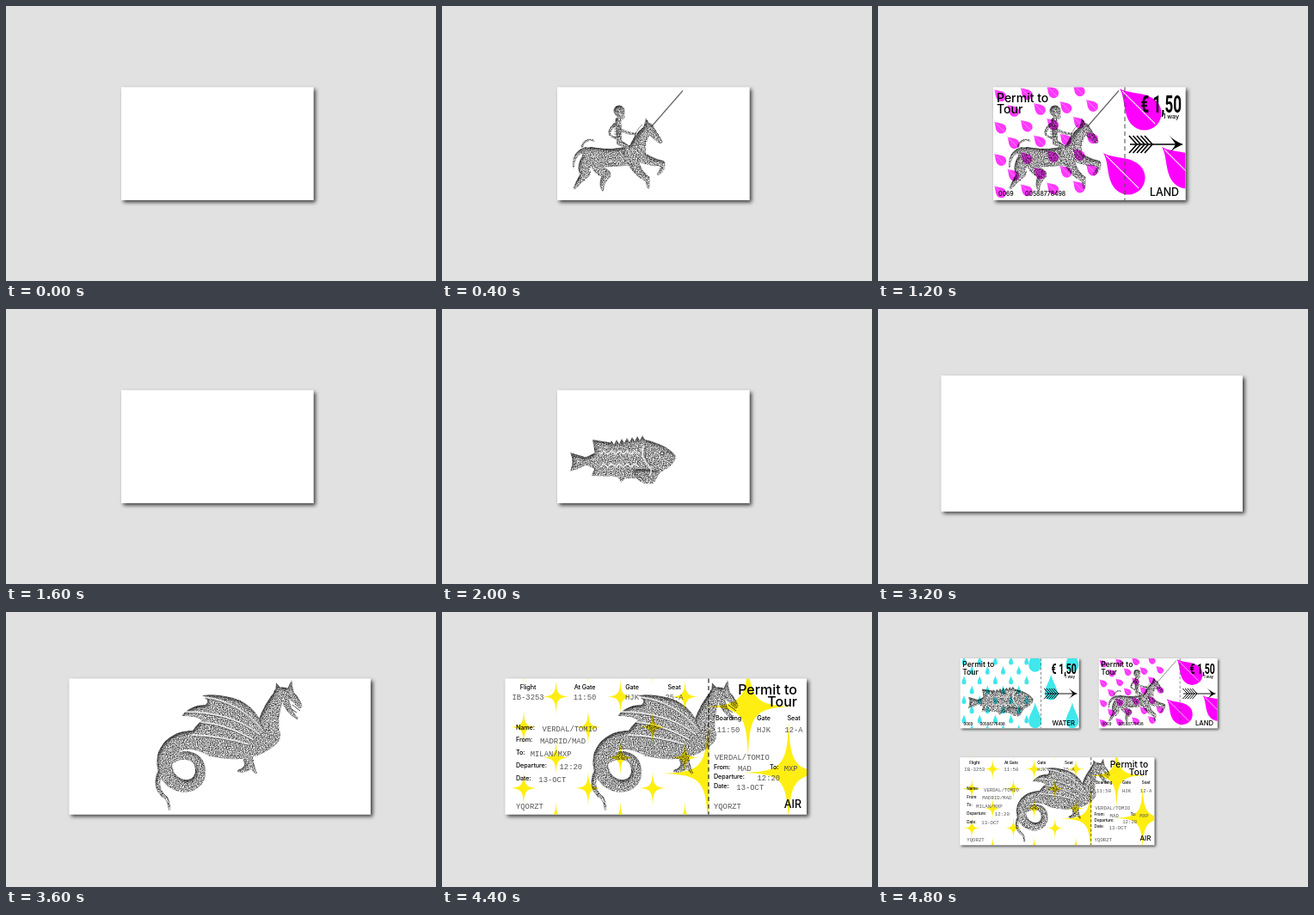
Animation, 500 px wide and 320 px high, one loop 5200 ms. Source, as an HTML page:

```html
<!DOCTYPE html>
<html lang="en">
<head>
<meta charset="utf-8">
<title>Travel tickets</title>
<style>
html, body { margin: 0; width: 100%; height: 100%; overflow: hidden; background: #e1e1e1; }
svg { display: block; }
text { font-family: Inter, "Open Sans", sans-serif; font-weight: 500; }
.title { font-size: 14px; }
.large { font-size: 16px; }
.label { font-size: 7.2px; letter-spacing: -.1px; }
.small { font-size: 6.9px; }
.kind { font-size: 12.4px; }
.price { font: 600 27px Roboto, sans-serif; }
.typed { font: 8.85px "Liberation Mono", monospace; letter-spacing: 0; fill: #555; }
.art { mix-blend-mode: multiply; }

/* Thirteen beats of 400 ms; --at is the beat on which a layer appears. */
.show { animation: 5200ms step-end infinite; animation-delay: calc((var(--at) - 13) * 400ms); }
.for4 { animation-name: for4; }
.for3 { animation-name: for3; }
.for2 { animation-name: for2; }
.for1 { animation-name: for1; }
@keyframes for4 { 0% { visibility: visible } 30.7692%, 100% { visibility: hidden } }
@keyframes for3 { 0% { visibility: visible } 23.0769%, 100% { visibility: hidden } }
@keyframes for2 { 0% { visibility: visible } 15.3846%, 100% { visibility: hidden } }
@keyframes for1 { 0% { visibility: visible } 7.6923%, 100% { visibility: hidden } }
</style>
</head>
<body>
<svg id="stage" width="500" height="320" viewBox="0 0 500 320">
  <defs>
    <filter id="shadow" x="-10%" y="-10%" width="120%" height="125%">
      <feDropShadow dx="2.5" dy="2.5" stdDeviation="2.2" flood-opacity=".72"/>
    </filter>
    <!-- Engraved look: soft relief multiplied by fine grain -->
    <filter id="ink" color-interpolation-filters="sRGB">
      <feGaussianBlur in="SourceAlpha" stdDeviation="2" result="soft"/>
      <feDiffuseLighting in="soft" surfaceScale="2.4" diffuseConstant="1.15" lighting-color="#fff" result="lit">
        <feDistantLight azimuth="60" elevation="60"/>
      </feDiffuseLighting>
      <feTurbulence type="fractalNoise" baseFrequency=".8" numOctaves="2" seed="4"/>
      <feColorMatrix values="1.5 0 0 0 -.12  1.5 0 0 0 -.12  1.5 0 0 0 -.12  0 0 0 0 1" result="grain"/>
      <feComposite in="lit" in2="grain" operator="arithmetic" k1="1" result="tone"/>
      <feComposite in="tone" in2="SourceAlpha" operator="in"/>
    </filter>

    <rect id="small-card" x="134" y="94.5" width="223.5" height="131.5"/>
    <rect id="large-card" x="73.5" y="77.5" width="350.5" height="158"/>
    <clipPath id="small-clip"><use href="#small-card"/></clipPath>
    <clipPath id="large-clip"><use href="#large-card"/></clipPath>

    <g id="leaf">
      <path fill="#f0f" d="M0 0C3 12 18 22 18 37A18 18 0 0 1-18 37C-18 22-3 12 0 0Z"/>
      <path stroke="#fff" d="M0 4V53"/>
    </g>
    <path id="drop" fill="#40e7eb" d="M0 0C2 13 12 24 12 37A12 12 0 0 1-12 37C-12 24-2 13 0 0Z"/>
    <path id="star" fill="#ffee12" d="M0-21C.5-3 2.5-.5 18 0C2.5.5.5 3 0 21C-.5 3-2.5.5-18 0C-2.5-.5-.5-3 0-21Z"/>

    <g id="arrow">
      <path stroke="#000" stroke-width="1.5" d="M293 161H350"/>
      <path d="M338 150Q344 157 355 161Q344 165 338 172Q344 165 346 161Q344 157 338 150Z"/>
    </g>
  </defs>
</svg>
<script>
const svg = document.getElementById('stage');
const defs = svg.querySelector('defs');
const add = (parent, markup) => parent.insertAdjacentHTML('beforeend', markup);
const use = (id, x, y, scale, turn = 0) =>
  `<use href="#${id}" transform="translate(${x} ${y}) rotate(${turn}) scale(${scale})"/>`;
const text = (cls, x, y, value, anchor = 'start') =>
  `<text class="${cls}" x="${x}" y="${y}" text-anchor="${anchor}">${value}</text>`;
const shape = d => `<path d="${d}"/>`;
const line = (d, color = '#333', width = .7) =>
  `<path d="${d}" fill="none" stroke="${color}" stroke-width="${width}" stroke-opacity=".75"/>`;
const inked = (...parts) => `<g filter="url(#ink)">${parts.join('')}</g>`;

// A round stroke whose radius runs evenly from start to end.
function limb(d, start, end) {
  const path = document.createElementNS('http://www.w3.org/2000/svg', 'path');
  path.setAttribute('d', d);
  const length = path.getTotalLength();
  let dots = '';
  for (let s = 0; s <= length; s++) {
    const { x, y } = path.getPointAtLength(s);
    const r = (start + (end - start) * s / length).toFixed(1);
    dots += `M${(x - r).toFixed(1)} ${y.toFixed(1)}a${r} ${r} 0 1 0 ${2 * r} 0a${r} ${r} 0 1 0 ${-2 * r} 0`;
  }
  return shape(dots);
}

const horse = inked(
  limb('M174 175Q200 180 226 170', 11, 10),
  limb('M227 168Q230 152 241 142', 10, 5),
  limb('M240 142L254 158', 6, 2.5),
  limb('M172 176Q160 192 168 194Q164 198 154 212', 9, 1.6),
  limb('M178 178Q182 192 192 196Q184 206 187 214', 9, 1.6),
  limb('M229 174Q242 182 256 183Q258 190 251 196', 7, 1.5),
  limb('M222 180Q228 196 239 201L240 212', 7, 1.5),
  limb('M167 167Q152 172 153 188', 3, 1),
  limb('M163 163Q168 153 177 157', 1.5, 1),
  shape('M235 139L237 130L242 138Z'));
const rider = inked(
  limb('M206 122L209 129', 6.5, 3.5),
  limb('M205 133L206 158', 3.5, 3),
  limb('M202 138Q208 148 226 149', 2, 1.4),
  limb('M201 138Q188 150 203 154', 2, 1.3),
  limb('M206 159Q222 165 212 172L218 185', 3, 1.5));
const mane = line('M222 160Q224 145 233 138M226 162Q229 148 237 142M190 184Q205 188 222 184')
  + line('M200 140h9' + 'm-9 3h9'.repeat(4) + 'M203 122l2 1m3 0h2M246 145l2 1', '#222');

const spines = 'l3-6 3 5'.repeat(8);
const scales = 'l4-4 5 4'.repeat(5);
const fish = inked(
    shape(`M166 173Q180 167 188 160${spines}Q262 158 272 171L270 178Q262 188 250 191Q225 202 195 194Q180 187 166 181Z`),
    shape('M169 173L149 167Q154 177 149 189Q160 186 169 181ZM178 169L175 152L199 156ZM178 183L174 194L196 195ZM204 194L208 202L214 196Z'))
  + inked(shape('M222 187Q226 206 246 203L254 190Q240 184 222 187Z'))
  + line(`M184 169${scales}M184 184${scales}M235 159Q229 170 240 182Q246 188 241 194`, '#fff', 1.6)
  + line('M238 159Q232 171 243 183M265 179Q267 174 272 174M150 170L167 175M150 185L168 179M226 192L238 202M234 189L246 200')
  + '<circle cx="256" cy="168" r="2" fill="#eee" stroke="#222"/>';

const wingFolds = 'M299 139Q272 104 230 99M295 143Q262 116 206 116M288 149Q255 130 226 128M282 154Q250 144 216 143';
const dragon = inked(
    limb('M317 98Q305 118 304 142', 7, 14),
    limb('M304 143Q282 164 240 156', 15, 12),
    limb('M240 156C205 138 180 158 185 182C190 206 222 210 226 188C228 166 205 160 188 176C172 192 174 208 186 216Q190 222 190 230', 12, 1.4),
    limb('M318 95Q330 90 342 110', 7, 2.8),
    limb('M324 99Q328 116 339 124', 5, 1.3),
    limb('M282 172Q284 184 270 185', 6, 1.4),
    limb('M284 176L291 188', 4, 1.2),
    shape('M313 99L314 82L323 92ZM326 92L332 79L335 94Z'))
  + inked(shape('M302 140Q290 103 255 98Q240 95 228 97Q238 103 232 108Q215 108 204 121Q222 121 228 126Q220 132 214 143Q232 142 236 150Q250 163 270 168Q290 160 302 140Z'))
  + line(wingFolds, '#fff', 1.8)
  + `<g transform="translate(1 1.6)">${line(wingFolds)}</g>`
  + line('M328 98l4 2M333 108l9 7m-10-2l6 4', '#111', 1);

// Staggered rows; every second one moves half a step.
function scatter(x0, y0, dx, dy, rows, maxX, draw, tilt = 0) {
  let out = '';
  for (let j = 0; j < rows; j++)
    for (let x = x0 - dx + (j % 2) * dx / 2; x < maxX; x += dx) out += draw(x, y0 + j * dy + (x - x0) * tilt);
  return out;
}
const leaf = (x, y, s) => use('leaf', x, y, s, -45);
const drop = (x, y, s) => use('drop', x, y, s);
const star = (x, y, s) => use('star', x, y, s);
const upTo = (fold, content) => `<svg width="${fold}" height="320">${content}</svg>`;

const foldLine = (x, y, height, color) =>
  `<path d="M${x} ${y}v${height}" stroke="${color}" stroke-width="1.1" stroke-dasharray="5 3.6"/>`;

const fare = (kind, fold) => foldLine(fold, 94.5, 131.5, '#555')
  + text('title', 138, 111.5, 'Permit to') + text('title', 138, 125, 'Tour')
  + `<g transform="translate(305.5 124) scale(.63 1)">${text('price', 0, 0, '€ 1,50')}</g>`
  + text('label', 350, 131, '1 way', 'end')
  + text('kind', 350, 221.3, kind, 'end')
  + text('small', 140, 221, '0069') + text('small', 171, 221, '00588778498')
  + use('arrow', 0, 0, 1)
  + `<path fill="none" stroke="#000" stroke-width="1.6" d="M292 151${'l9 10-9 10m4.5-20'.repeat(5)}"/>`;

const column = (x, y, drop, label, value) =>
  text('label', x, y, label, 'middle') + text('typed', x, y + drop, value, 'middle');
const field = (x, y, label, value) => text('label', x, y,
  `${label}:<tspan class="typed" dx="${4 + label.length * 1.2}" dy="2">${value}</tspan>`);

const holder = 'VERDAL/TOMIO';
const booking = { Name: holder, From: 'MADRID/MAD', To: 'MILAN/MXP', Departure: '12:20', Date: '13-OCT' };
const stub = { From: 'MAD', Departure: '12:20', Date: '13-OCT' };
const list = (fields, x, y, step) =>
  Object.entries(fields).map(([label, value], i) => field(x, y + i * step, label, value)).join('');

const boarding = foldLine(310, 77.5, 158, '#111')
  + text('large', 413, 96, 'Permit to', 'end') + text('large', 413, 110, 'Tour', 'end')
  + column(100, 90, 12, 'Flight', 'IB-3253') + column(166, 90, 12, 'At Gate', '11:50')
  + column(221, 90, 12, 'Gate', 'HJK') + column(270, 90, 12, 'Seat', '25-A')
  + column(333, 126, 14, 'Boarding', '11:50') + column(374, 126, 14, 'Gate', 'HJK')
  + column(409, 126, 14, 'Seat', '12-A')
  + list(booking, 86, 136.5, 14.9)
  + list(stub, 316, 183, 11) + field(381, 183, 'To', 'MXP')
  + text('typed', 317, 172, holder)
  + text('typed', 86, 229, 'YQORZT') + text('typed', 316, 229, 'YQORZT')
  + text('kind', 418, 228, 'AIR', 'end');

// "spot" is the ticket's corner and scale in the closing group.
const tickets = {
  land: {
    size: 'small', spot: [256.8, 54, .617],
    art: horse + rider + mane + line('M243 141L280 98.5', '#333', 1.2),
    pattern: `<g opacity=".78">${scatter(142, 105, 30.5, 18.7, 7, 252, (x, y) => leaf(x - 7, y - 8, .32), -.065)}</g>`
      + leaf(281, 96, 1.1) + leaf(262, 171, 1.1) + leaf(330, 164, 1.1),
    info: fare('LAND', 287)
  },
  water: {
    size: 'small', spot: [95.7, 54, .617],
    art: fish,
    pattern: scatter(141, 98, 29.5, 18.4, 8, 262, (x, y) => drop(x, y - 8, .34))
      + [71, 177].map(y => drop(275, y, 1) + drop(345, y, 1)).join('') + drop(305, 124, 1),
    info: fare('WATER', 286)
  },
  air: {
    size: 'large', spot: [95.2, 169.2, .645],
    art: dragon,
    pattern: upTo(310, scatter(95, 63, 75, 35.5, 6, 290, (x, y) => star(x, y, 1)) + star(309, 188, 2.9))
      + star(356, 110, 2.9) + star(403, 187, 2.9),
    info: boarding
  }
};

// Layers in painting order, with the beat each one waits for.
const layers = [['card', 0], ['pattern', 2], ['art', 1], ['info', 3]];
const ticket = (kind, timing) => layers.map(([layer, wait]) => {
  const [beats, at] = timing(wait);
  return `<use href="#${kind}-${layer}" class="${layer} show for${beats}" style="--at:${at}"/>`;
}).join('');

Object.entries(tickets).forEach(([kind, { size, art, pattern, info }], i) => {
  add(defs, `<g id="${kind}-card" fill="#fff" filter="url(#shadow)"><use href="#${size}-card"/></g>
    <g id="${kind}-art">${art}</g>
    <g id="${kind}-pattern" clip-path="url(#${size}-clip)">${pattern}</g>
    <g id="${kind}-info">${info}</g>`);
  add(svg, ticket(kind, wait => [4 - wait, 4 * i + wait]));
});

for (const [kind, { size, spot: [x, y, scale] }] of Object.entries(tickets)) {
  const card = document.getElementById(`${size}-card`);
  const corner = `${-card.getAttribute('x')} ${-card.getAttribute('y')}`;
  add(svg, `<g transform="translate(${x} ${y}) scale(${scale}) translate(${corner})">${ticket(kind, () => [1, 12])}</g>`);
}
</script>
</body>
</html>
```
